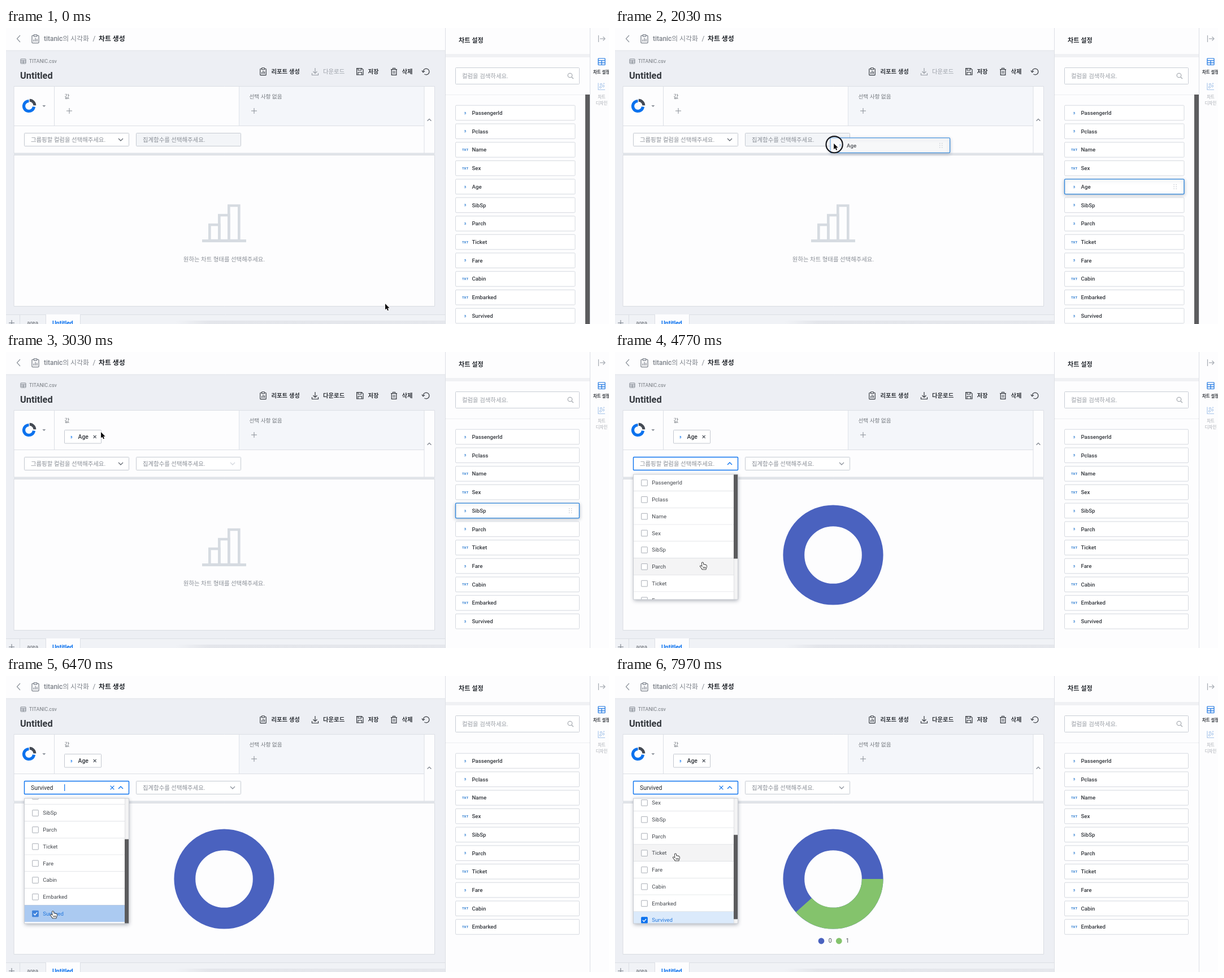
These frames come from a looping animation (1067x525 px, 8000 ms). An HTML page with a canvas:

```html
<!DOCTYPE html>
<html lang="ko">
<head>
<meta charset="utf-8">
<title>차트 생성</title>
<style>
html, body { margin: 0; width: 100%; height: 100%; overflow: hidden; background: #fff; }
canvas { display: block; width: 1067px; height: 525px; }
</style>
</head>
<body>
<canvas id="stage"></canvas>
<script>
const W = 1067, H = 525, LOOP = 8000, UI = 0.743;
const FONT = 'Roboto, "Noto Sans CJK KR", "Noto Sans CJK", sans-serif';
const INK = '#33373d', GREY = '#8a8f97', BLUE = '#0b72ee', EDGE = '#d5d9df', PALE = '#d6dbe1';
const COLUMNS = ['PassengerId', 'Pclass', 'Name', 'Sex', 'Age', 'SibSp', 'Parch', 'Ticket', 'Fare', 'Cabin', 'Embarked', 'Survived'];
const TEXTUAL = ['Name', 'Sex', 'Ticket', 'Cabin', 'Embarked'];
const GRAB = 1250, DROP = 2540, READY = 3350, OPEN = 3950, PICK = 6350, SPLIT = 6750;
const MAX_SCROLL = 108, ROW = 29.75;

// time, x, y of the pointer
const PATH = [
  [150, 671, 489], [1000, 802, 278], [1450, 802, 278], [2473, 112, 156], [2700, 112, 156],
  [3000, 168, 142], [3350, 168, 142], [3850, 190, 197], [4150, 190, 197], [4700, 155, 373],
  [5750, 155, 373], [6150, 83, 417], [6850, 83, 417], [7300, 107, 315]
];

const canvas = document.getElementById('stage');
const ctx = canvas.getContext('2d');
const dpr = window.devicePixelRatio || 1;
canvas.width = Math.round(W * dpr);
canvas.height = Math.round(H * dpr);

const smooth = (t, a, b) => {
  const u = Math.min(1, Math.max(0, (t - a) / (b - a)));
  return u * u * (3 - 2 * u);
};

function text(s, x, y, px, color = INK, weight = 400, align = 'left') {
  const size = px * UI;
  ctx.font = `${weight} ${size}px ${FONT}`;
  ctx.textAlign = align;
  ctx.fillStyle = color;
  ctx.fillText(s, x, y + size * 0.355);
}

function fill(x, y, w, h, color) {
  ctx.fillStyle = color;
  ctx.fillRect(x, y, w, h);
}

function box(x, y, w, h, stroke, bg, r = 0, lw = 1) {
  ctx.beginPath();
  ctx.roundRect(x, y, w, h, r);
  if (bg) { ctx.fillStyle = bg; ctx.fill(); }
  if (stroke) { ctx.strokeStyle = stroke; ctx.lineWidth = lw; ctx.stroke(); }
}

function line(color, lw, ...pts) {
  ctx.beginPath();
  for (let i = 0; i < pts.length; i += 2) ctx.lineTo(pts[i], pts[i + 1]);
  ctx.strokeStyle = color;
  ctx.lineWidth = lw;
  ctx.stroke();
}

function arc(x, y, r, a, b, color, lw) {
  ctx.beginPath();
  ctx.arc(x, y, r, a, b);
  ctx.strokeStyle = color;
  ctx.lineWidth = lw;
  ctx.stroke();
}

function disc(x, y, r, color) {
  ctx.beginPath();
  ctx.arc(x, y, r, 0, 7);
  ctx.fillStyle = color;
  ctx.fill();
}

function shadow(blur, dy, color, draw) {
  ctx.save();
  ctx.shadowBlur = blur * dpr;
  ctx.shadowOffsetY = dy * dpr;
  ctx.shadowColor = color;
  draw();
  ctx.restore();
}

const chevron = (x, y, dir, color, r = 4) => line(color, 1.3, x - r, y - dir * r / 2, x, y + dir * r / 2, x + r, y - dir * r / 2);
const plus = (x, y, r, color) => {
  line(color, 1.1, x - r, y, x + r, y);
  line(color, 1.1, x, y - r, x, y + r);
};
const cross = (x, y, r, color) => {
  line(color, 1.2, x - r, y - r, x + r, y + r);
  line(color, 1.2, x - r, y + r, x + r, y - r);
};

function clipboard(x, y, k, color) {
  ctx.save();
  ctx.translate(x, y);
  ctx.scale(k, k);
  box(-5.5, -5.5, 11, 12, color, null, 1, 1.2);
  box(-2.5, -7, 5, 3, color, '#f4f5f8', 0.5, 1.1);
  line(color, 1.2, -2.6, 4, -2.6, 1);
  line(color, 1.2, 0, 4, 0, -1.5);
  line(color, 1.2, 2.6, 4, 2.6, -0.2);
  ctx.restore();
}

function table(x, y, w, h, color, lw) {
  box(x, y, w, h, color, null, 0.5, lw);
  line(color, lw, x, y + h * 0.33, x + w, y + h * 0.33);
  line(color, lw, x, y + h * 0.67, x + w, y + h * 0.67);
  line(color, lw, x + w / 2, y + h * 0.33, x + w / 2, y + h);
}

function header() {
  fill(0, 0, 777, 40, '#fdfdfe');
  line('#dfe2e8', 1, 0, 40, 777, 40);
  line('#8d939c', 1.2, 25, 13, 19.5, 19, 25, 25);
  clipboard(52, 19.5, 1.1, '#7d838c');
  text('titanic의 시각화', 67, 19, 16, '#7d828a', 500);
  text('/', 153.5, 19, 16, '#7d828a');
  text('차트 생성', 164, 19, 16, '#22262c', 700);
}

function toolbar(t) {
  table(26, 55, 9, 8, '#7d838c', 1);
  text('TITANIC.csv', 41, 59, 12, '#74797f');
  text('Untitled', 25, 84, 22, '#33373d', 700);
  clipboard(455, 77.5, 0.95, INK);
  text('리포트 생성', 469.5, 77, 14, INK, 700);

  const dl = t < DROP ? '#9a9fa7' : INK;
  line(dl, 1.2, 547, 71, 547, 80);
  line(dl, 1.2, 543.5, 77, 547, 80.5, 550.5, 77);
  line(dl, 1.2, 541.5, 80, 541.5, 83.5, 552.5, 83.5, 552.5, 80);
  text('다운로드', 561, 77, 14, dl, t < DROP ? 500 : 700);

  line(INK, 1.2, 620.6, 71.6, 629.5, 71.6, 632, 74, 632, 83, 620.6, 83, 620.6, 71);
  line(INK, 1.1, 623, 72, 623, 75, 628.5, 75, 628.5, 72);
  line(INK, 1.1, 623, 83, 623, 78.5, 629.5, 78.5, 629.5, 83);
  text('저장', 640.5, 77, 14, INK, 700);

  line(INK, 1.2, 681, 73.5, 692, 73.5);
  line(INK, 1.1, 684.5, 73, 684.5, 71.3, 688.5, 71.3, 688.5, 73);
  line(INK, 1.2, 682.3, 74, 682.3, 83.3, 690.8, 83.3, 690.8, 74);
  line(INK, 1, 685.2, 76, 685.2, 81);
  line(INK, 1, 687.8, 76, 687.8, 81);
  text('삭제', 700.5, 77, 14, INK, 700);

  arc(743.5, 77.5, 5.4, Math.PI, Math.PI * 2.7, INK, 1.2);
  line(INK, 1.2, 735.8, 75.5, 738.1, 78.6, 741, 76.2);
}

function select(x, label, o) {
  box(x + 0.5, 186.5, 185, 23, o.edge, o.bg, 1, o.edge === BLUE ? 1.4 : 1);
  text(label, x + 12, 198, 14, o.color);
  if (o.arrow) chevron(x + 171, 198, o.dir || 1, o.arrow);
}

function settings(t) {
  const open = t >= OPEN, picked = t >= PICK;
  box(14, 103.5, 744.5, 118.5, '#dcdfe5', '#fdfdfe');
  fill(412.5, 104, 327.5, 69, '#f4f6fa');
  line('#dcdfe5', 1, 14, 173.5, 740, 173.5);
  line('#dcdfe5', 1, 85.5, 104, 85.5, 173);
  line('#e0e3e9', 1, 412.5, 104, 412.5, 173);
  line('#dcdfe5', 1, 740, 104, 740, 222);
  chevron(749, 163, -1, '#7d838c', 3.4);

  arc(40.5, 138.5, 9, 0.12, Math.PI * 1.5, BLUE, 5.2);
  arc(41.8, 137.3, 9, -Math.PI / 2, 0, '#454b55', 5);
  ctx.beginPath();
  ctx.moveTo(64.3, 137); ctx.lineTo(70.3, 137); ctx.lineTo(67.3, 140.2);
  ctx.fillStyle = '#8d939c';
  ctx.fill();

  text('값', 103.5, 122, 13, '#74797f');
  text('선택 사항 없음', 430.5, 122, 13, '#74797f');
  plus(439, 147, 5, '#90959d');
  if (t < DROP) plus(112, 147, 5, '#90959d');
  else {
    box(103.5, 138.5, 65, 23.5, '#c3c8d0', '#fff', 1);
    text('3', 114, 150.5, 8, BLUE, 700);
    text('Age', 127.5, 150.5, 14, INK, 500);
    cross(157.2, 150.4, 2.5, '#454b55');
  }

  select(32, picked ? 'Survived' : '그룹핑할 컬럼을 선택해주세요.', {
    edge: open ? BLUE : '#c3c8cf', bg: '#fff', color: picked ? '#22262c' : GREY,
    arrow: open ? BLUE : '#666c75', dir: open ? -1 : 1
  });
  if (picked) {
    cross(188, 198, 3.3, BLUE);
    if ((t + 220) % 1060 < 530) line(BLUE, 1.2, 103.7, 192, 103.7, 204);
  }
  const locked = t < DROP;
  select(230, '집계함수를 선택해주세요.', {
    edge: '#c6cbd2', bg: locked ? '#f3f5f8' : '#fff', color: GREY,
    arrow: locked ? null : t < READY ? '#d4d8de' : '#8d939c'
  });
}

function chart(t) {
  box(14, 225.5, 744.5, 268, '#d9dce2', '#fdfdfe');
  if (t < READY) {
    for (let i = 0; i < 3; i++) box(360.3 + i * 17, 349 - i * 17, 17 + (i === 2), 28 + i * 17, PALE, null, 0, 4.6);
    fill(347, 375, 78, 5, PALE);
    text('원하는 차트 형태를 선택해주세요.', 386, 410.5, 14, GREY, 400, 'center');
    return;
  }
  const blue = '#4a62bf', green = '#84c36c', cut = (549 / 891) * Math.PI * 2;
  arc(386, 360, 69.7, 0, Math.PI * 2, blue, 37.8);
  if (t < SPLIT) return;
  arc(386, 360, 69.7, 0, Math.PI * 2 - cut, green, 37.8);
  [blue, green].forEach((c, i) => {
    disc(365 + i * 31.3, 470, 5.4, c);
    text(String(i), 377.7 + i * 30.8, 469, 14, '#4b5057');
  });
}

function tabs() {
  fill(0, 508, 777, 17, '#f0f2f6');
  line('#dcdfe5', 1, 0, 508.5, 777, 508.5);
  fill(70, 508, 61, 17, '#fdfdfe');
  [24.5, 70.5, 131.5].forEach(x => line('#dcdfe5', 1, x, 508, x, 525));
  plus(10, 523, 5, '#7d838c');
  text('area', 37, 523, 14, '#666b72');
  text('Untitled', 82, 523, 14, BLUE, 700);
  const g = ctx.createLinearGradient(300, 0, 777, 0);
  g.addColorStop(0, 'rgba(205,207,214,0)');
  g.addColorStop(0.12, 'rgba(205,207,214,.35)');
  g.addColorStop(1, 'rgba(205,207,214,.3)');
  fill(300, 519, 477, 6, g);
}

function column(name, x, y, w, active) {
  const draw = () => box(x, y, w, 26.5, active ? '#2f86dc' : EDGE, '#fff', 1.5, active ? 1.4 : 1);
  if (active) shadow(6, 2, 'rgba(40,60,90,.28)', draw); else draw();
  const cy = y + 13.3, kind = TEXTUAL.includes(name) ? 'TXT' : '3';
  text(kind, x + 17, cy, 8, '#2b7bd0', 700, 'center');
  text(name, x + 29, cy, 13, INK, 500);
  if (!active) return;
  for (let i = 0; i < 6; i++) fill(x + w - 18.5 + (i % 2) * 4, cy - 4.2 + (i >> 1) * 3.6, 1.3, 1.3, '#b9bec6');
}

function panel(t, p) {
  fill(777, 0, 290, H, '#fdfdfe');
  line('#dcdfe5', 1, 777.5, 0, 777.5, H);
  line('#dcdfe5', 1, 1033.5, 0, 1033.5, H);
  text('차트 설정', 801, 22, 15, '#2b2f35', 700);
  fill(778, 46, 255, 6, '#f0f1f4');
  box(795.5, 70.5, 219, 29, '#c8cdd4', '#fff', 1);
  text('컬럼을 검색하세요.', 807, 85, 14, '#9a9fa6');
  arc(998, 84, 3.8, 0, 7, '#9a9fa6', 1.1);
  line('#9a9fa6', 1.1, 1000.8, 86.8, 1004, 90);
  ctx.setLineDash([1, 1]);
  line('#dcdfe5', 1, 778, 118.5, 1033, 118.5);
  ctx.setLineDash([]);

  const before = t < DROP, w = before ? 211.5 : 219;
  const rows = COLUMNS.filter(c => !(c === 'Age' && !before) && !(c === 'Survived' && t >= PICK));
  const stale = t >= GRAB && t < 3150;
  rows.forEach((name, i) => {
    const y = 137.2 + i * 32.73;
    const over = p.x >= 795 && p.y >= y && p.y <= y + 26.5;
    column(name, 795.5, y, w, stale ? i === 4 : over);
  });
  if (before) fill(1025, 118, 8, H - 118, '#5c5c5e');

  line('#a4a9b1', 1.2, 1048.5, 13, 1048.5, 25);
  line('#a4a9b1', 1.2, 1051, 19, 1060, 19);
  line('#a4a9b1', 1.2, 1056.5, 15.5, 1060, 19, 1056.5, 22.5);
  table(1048, 54, 12, 11.5, '#1672e0', 1.2);
  text('차트 설정', 1039, 78.5, 10, INK, 700);
  const faint = '#a5c4ea';
  line(faint, 1.1, 1048, 97.5, 1048, 109.5, 1060, 109.5);
  [[1052, 105], [1053, 100], [1057, 103]].forEach(c => arc(c[0], c[1], 1.6, 0, 7, faint, 1));
  disc(1058, 98.5, 1, faint);
  text('차트', 1054, 122.5, 10, '#a4a8af', 400, 'center');
  text('디자인', 1054, 133.5, 10, '#a4a8af', 400, 'center');
}

function dropdown(t, p) {
  const scroll = MAX_SCROLL * (smooth(t, 5050, 5700) - 0.107 * smooth(t, 7620, 7970));
  shadow(7, 2, 'rgba(30,40,60,.38)', () => fill(32.5, 217, 185, 222, '#fff'));
  ctx.save();
  ctx.beginPath();
  ctx.rect(32.5, 217, 185, 222);
  ctx.clip();
  COLUMNS.filter(c => c !== 'Age').forEach((name, i) => {
    const y = 217 + i * ROW - scroll, cy = y + 15;
    const over = p.x > 32 && p.x < 210 && p.y >= y && p.y < y + ROW && p.y > 217;
    const on = name === 'Survived' && t >= PICK;
    const bg = on ? (over ? '#abcaf1' : '#dbeafb') : over ? '#f4f4f5' : '#fff';
    fill(32.5, y, 178, ROW, bg);
    if (!on) line('#c9cdd3', 1, 32, y + ROW, 210, y + ROW);
    const mark = over ? '#3f83dc' : BLUE;
    box(46.7, cy - 5.2, 10.6, 10.6, on ? mark : '#a9aeb6', on ? mark : '#fff', 0.5);
    if (on) line('#fff', 1.3, 49, cy, 51.2, cy + 2.4, 55.2, cy - 2.2);
    text(name, 65.3, cy, 13, on ? '#2277dd' : '#44484e');
  });
  fill(210, 217, 7.5, 222, '#f3f3f4');
  line('#dfe0e3', 1, 210.5, 217, 210.5, 439);
  fill(210, 217 + scroll * 72.5 / MAX_SCROLL, 7.5, 149.5, '#5b5b5d');
  ctx.restore();
  box(32.5, 217, 185, 222, '#c9cdd3');
}

function pointerAt(t) {
  let a = PATH[0];
  for (const b of PATH) {
    if (t < b[0]) {
      const u = smooth(t, a[0], b[0]);
      return { x: a[1] + (b[1] - a[1]) * u, y: a[2] + (b[2] - a[2]) * u };
    }
    a = b;
  }
  return { x: a[1], y: a[2] };
}

function outline(x, y, fillColor, edge, lw, d) {
  ctx.save();
  ctx.translate(x, y);
  const path = new Path2D(d);
  ctx.lineJoin = 'round';
  ctx.strokeStyle = edge;
  ctx.lineWidth = lw;
  ctx.fillStyle = fillColor;
  ctx.stroke(path);
  ctx.fill(path);
  ctx.restore();
}

function pointer(t, p) {
  const down = (t >= GRAB && t < DROP) || (t >= OPEN - 60 && t < OPEN + 60) || (t >= PICK - 80 && t < PICK + 40);
  if (down) {
    disc(p.x + 1, p.y + 2, 14.5, 'rgba(255,255,255,.35)');
    arc(p.x + 1, p.y + 2, 14.6, 0, 7, '#15171c', 2.2);
  }
  if (t > 3750) {
    outline(p.x, p.y, '#fff', '#111', 1.5,
      'M-1.2 1Q0 -.5 1 1L1.6 4.5Q2.8 3.6 3.6 4.6Q4.8 4 5.4 5Q6.8 4.6 7 6.2Q7.3 9 6 10.6L5.6 12.6H-.4Q-1.4 10.6 -3.2 8.6Q-5 6.6 -3.8 6.2Q-2.6 6 -.6 8Z');
    [1.6, 3.5, 5.3].forEach(dx => line('#111', 0.8, p.x + dx - 0.4, p.y + 8, p.x + dx - 0.4, p.y + 10.8));
  } else {
    outline(p.x, p.y, '#0c0c0e', '#fff', 1.6, 'M0 0V10.6L2.5 8.4L4.2 12.2L6 11.4L4.3 7.7H7.6Z');
  }
}

function render(t) {
  ctx.setTransform(dpr, 0, 0, dpr, 0, 0);
  const p = pointerAt(t);
  fill(0, 0, W, H, '#edeff4');
  header();
  toolbar(t);
  fill(14, 222, 744.5, 4, '#e2e5ea');
  settings(t);
  chart(t);
  tabs();
  panel(t, p);
  if (t >= OPEN) dropdown(t, p);
  if (t >= GRAB && t < DROP) {
    ctx.globalAlpha = 0.86;
    column('Age', p.x - 6, p.y - 9.8, 211.5, true);
    ctx.globalAlpha = 1;
  }
  pointer(t, p);
}

const start = performance.now();
function tick() {
  render((performance.now() - start) % LOOP);
  requestAnimationFrame(tick);
}
tick();
</script>
</body>
</html>
```
